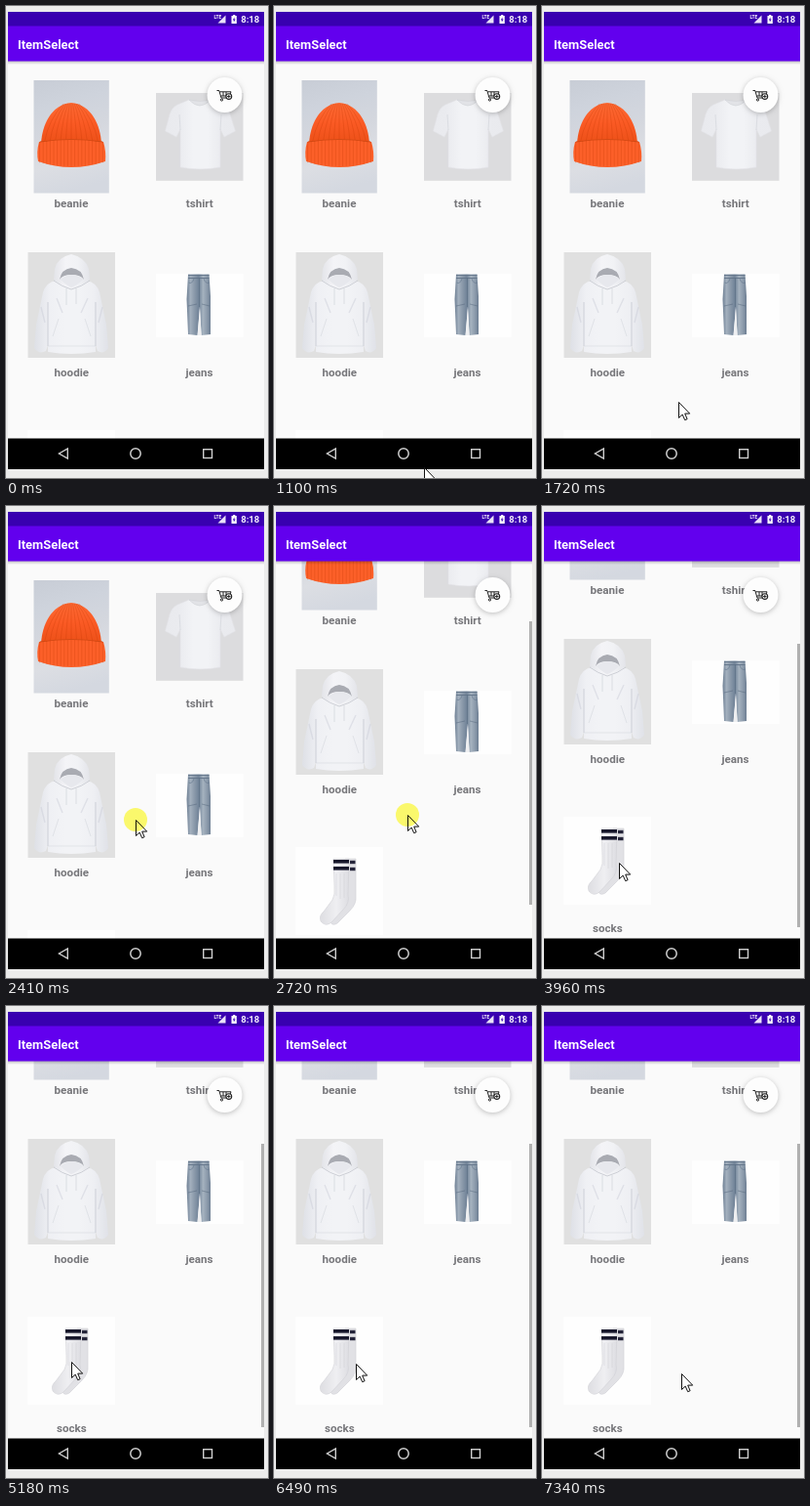
Recreate the animation shown at these times as an HTML page with a canvas. Size 269 by 483 pixels, loop 8000 ms.

```html
<!DOCTYPE html>
<html lang="en">
<head>
<meta charset="utf-8">
<title>ItemSelect</title>
<style>
html, body { margin: 0; width: 100%; height: 100%; overflow: hidden; background: #ececec; }
canvas { display: block; width: 269px; height: 483px; }
</style>
</head>
<body>
<canvas id="stage" width="269" height="483"></canvas>
<script>
const ctx = document.getElementById('stage').getContext('2d');
const LOOP = 8000, STEP = 78;

// Keyframes: [time, ...values]
const cursorKeys = [
  [1100, 154, 472], [1260, 150, 449], [1410, 144, 426], [1570, 139, 411], [1720, 140, 405],
  [2020, 140, 405], [2410, 133, 321], [2720, 137, 316], [3120, 137, 316], [3430, 120, 344],
  [3740, 91, 365], [4040, 67, 365], [4269, 67, 365], [4270, 67, 364], [4439, 67, 364],
  [4440, 67, 363], [4749, 67, 363], [4750, 67, 364], [6010, 67, 364], [6480, 84, 366],
  [6850, 107, 375], [7090, 141, 376], [7180, 141, 376], [7260, 142, 376], [7340, 143, 376]
];
const scrollKeys = [
  [2410, 0], [2490, 20], [2720, 85], [2870, 85], [2950, 96], [3030, 105], [3120, 112], [3180, 115], [3260, 116]
];
const presses = [[1890, 2950], [4440, 4590]];

function sample(keys, t) {
  if (t <= keys[0][0]) return keys[0].slice(1);
  for (let i = 1; i < keys.length; i++) {
    const a = keys[i - 1], b = keys[i];
    if (t >= b[0]) continue;
    const span = b[0] - a[0], n = Math.max(1, Math.round(span / STEP));
    const u = Math.floor((t - a[0]) / span * n + 1e-6) / n;
    return a.slice(1).map((v, k) => v + (b[k + 1] - v) * u);
  }
  return keys[keys.length - 1].slice(1);
}

function rect(x, y, w, h, color) {
  ctx.fillStyle = color;
  ctx.fillRect(x, y, w, h);
}

function shape(d, fill, stroke, width = 1) {
  const path = new Path2D(d);
  if (fill) { ctx.fillStyle = fill; ctx.fill(path); }
  if (stroke) { ctx.strokeStyle = stroke; ctx.lineWidth = width; ctx.stroke(path); }
}

function disc(x, y, r, fill, stroke, width = 1) {
  ctx.beginPath();
  ctx.arc(x, y, r, 0, Math.PI * 2);
  if (fill) { ctx.fillStyle = fill; ctx.fill(); }
  if (stroke) { ctx.strokeStyle = stroke; ctx.lineWidth = width; ctx.stroke(); }
}

function text(str, x, y, font, color, align = 'left') {
  ctx.font = font + ' Roboto, sans-serif';
  ctx.textAlign = align;
  ctx.fillStyle = color;
  ctx.fillText(str, x, y);
}

function gradient(x0, y0, x1, y1, ...colors) {
  const g = ctx.createLinearGradient(x0, y0, x1, y1);
  colors.forEach((c, i) => g.addColorStop(i / (colors.length - 1), c));
  return g;
}

function label(str, x, y) {
  text(str, x, y, 'bold 11.6px', '#76767a', 'center');
}

function beanie() {
  rect(28.5, 76, 77.3, 115.5, gradient(28, 76, 60, 191, '#c8cdd6', '#ced3dc', '#d4d7de', '#dcdee3', '#d4d8e0'));
  shape('M36 141C37 122 46 101 67 99C88 101 97 122 98 141Z', gradient(0, 99, 0, 141, '#fd6a34', '#fa5a24', '#ec5018'));
  for (let i = -5; i <= 5; i++) {
    shape(`M${67 + i * 1.6} 100Q${67 + i * 4.6} 116 ${67 + i * 5.5} 139`, null, 'rgba(195,55,5,.3)', 0.9);
  }
  shape('M34 139Q67 134 100 139Q103 149 102 159Q67 171 33 159Q31 149 34 139Z', '#fc6029');
  shape('M35 139Q67 134 99 139', null, '#d34a15', 1.2);
  for (let i = -9; i <= 9; i++) {
    const x = 67 + i * 3.6, sag = i * i * 0.045;
    shape(`M${x} ${137 + sag * 0.5}V${164 - sag}`, null, 'rgba(195,55,5,.3)', 0.9);
  }
}

function tshirt() {
  rect(154, 89, 89.5, 89.8, '#dcdcde');
  shape('M188 96L176 101Q170 104 168 111L163.5 128L175 134L179 126L179 165Q199 169 220 165L220 126L224 134L235.5 128L230 111Q228 104 222 101L210 96Q199 103 188 96Z',
    gradient(163, 0, 236, 0, '#e9eaee', '#eaebef', '#f2f3f6', '#f2f3f6', '#eaebef', '#e9eaee'), '#e2e3e8', 0.6);
  shape('M188 96Q199 108 210 96Q199 99 188 96Z', '#e2e3e7', '#d2d3d9', 0.6);
  shape('M179 127L178 111M220 127L221 111', null, '#d9dbe0', 0.9);
}

function hoodie() {
  rect(22.5, 252, 89.5, 108, '#e0e0e0');
  shape('M51 281Q41 283 38 293L31 326L29 350Q34 357 41 353L43 347L43 354Q67 358 92 354L92 347L94 353Q100 357 105 350L103 326L96 293Q93 283 83 281Z',
    gradient(30, 0, 105, 0, '#dfe1e7', '#eff0f4', '#f2f3f6', '#f2f3f6', '#eeeff3', '#e0e2e8'));
  shape('M67 254Q53 257 50 269L49 280Q57 286 67 289Q78 286 86 280L85 269Q81 257 67 254Z', gradient(49, 0, 86, 0, '#e3e4e9', '#f4f4f7', '#f1f2f5', '#e3e4e9'));
  shape('M55 280Q57 269 67 268Q78 269 80 280Q77 275 67 275Q58 275 55 280Z', '#a9abb2');
  shape('M56 280Q62 275 67 275Q74 275 79 280Q73 286 67 288Q62 286 56 280Z', '#e7e8ed');
  shape('M49 281Q57 287 67 290Q78 287 86 281', null, '#c9cbd2', 0.9);
  shape('M62 289V306M72 289V305', null, '#d2d4da', 0.7);
  shape('M54 320L48 338M81 320L87 338M43 348H92', null, '#d9dbe1', 0.7);
  shape('M43 303V348M92 303V348', null, '#cfd2d9', 1.1);
  shape('M36 308L40 324M99 308L95 324M52 299L58 314M84 299L77 314', null, 'rgba(200,203,212,.45)', 1.4);
}

function jeans() {
  rect(154, 274, 89.8, 65, '#fefefe');
  const denim = gradient(185, 0, 211, 0, '#66788d', '#a3b0be', '#8998a9', '#718398', '#a5b2bf', '#8a99aa', '#64768b');
  shape('M187 274.5H208.5L210 297V336L200.5 337L199 308L196.5 337L187 336L185.5 300Z', denim);
  shape('M187 275.5H208.5M187 278.5H208.5', null, '#62748a', 0.9);
  shape('M198.5 278V308', null, '#5f7187', 0.8);
  shape('M187.5 283Q191 285 193 279M203 279Q205 285 209 283', null, '#697b91', 0.7);
  shape('M187 307L196 305M201 305L209 307', null, 'rgba(84,102,124,.5)', 1);
  shape('M199 309L196.7 337H200.7Z', '#eeeff1');
}

function socks() {
  rect(22, 434, 90, 90, '#fefefe');
  shape('M73 446H84V484Q85 492 78 499L65 512Q60 515 58 511L72 490Z', '#e1e1e5', '#d0d0d5', 0.6);
  shape('M61 446H77L76 483Q78 491 71 498L59 511Q53 516 48 510Q46 504 51 500L60 488Q63 483 62 474Z', gradient(50, 0, 78, 0, '#e0e0e4', '#efeff2', '#dcdce1'), '#d0d0d5', 0.6);
  for (const y of [447, 454]) {
    rect(61, y, 16, 3.6, '#17172b');
    rect(78, y + 0.8, 5.5, 3.4, '#25253a');
  }
  shape('M64 461V484M68 461V487M72 461V486', null, 'rgba(190,190,198,.4)', 0.8);
}

function items(scroll) {
  ctx.save();
  ctx.beginPath();
  ctx.rect(2, 56, 263, 387);
  ctx.clip();
  ctx.translate(0, -scroll);
  beanie();
  tshirt();
  hoodie();
  jeans();
  socks();
  label('beanie', 67, 206);
  label('tshirt', 198.7, 206);
  label('hoodie', 67.3, 379);
  label('jeans', 198.5, 379);
  label('socks', 67.3, 552);
  ctx.restore();
}

function cartButton() {
  ctx.save();
  ctx.shadowColor = 'rgba(0,0,0,.24)';
  ctx.shadowBlur = 5;
  ctx.shadowOffsetY = 1.2;
  disc(224.5, 91, 18, '#fdfdfd');
  ctx.restore();
  shape('M216.5 86.5H218.8L221 94H228M219.5 87.8H231L229.5 92H220.8M223 88V92M226 88V92', null, '#222', 1);
  disc(221.5, 96, 1.1, null, '#222');
  disc(228.8, 92.6, 2.9, '#fff', '#222', 1.1);
  shape('M227 92.6H230.6M228.8 90.8V94.4', null, '#222', 1);
}

function bars() {
  rect(2, 56, 263, 4, gradient(0, 56, 0, 60, 'rgba(0,0,0,.24)', 'rgba(0,0,0,0)'));
  rect(2, 20, 263, 36.5, '#6200ee');
  rect(2, 6, 263, 14.5, '#3900b0');
  text('ItemSelect', 12, 43.7, 'bold 12.9px', '#fff');

  text('LTE', 213.5, 13, 'bold 4.8px', '#fff');
  shape('M225.5 9.5V17.5H217.5Z', '#e9e2f8');
  shape('M232 10H233.2V9H235.3V10H236.8V18H231.5V10Z', '#fff');
  shape('M234.6 11.2L232.8 14.4H234L233.7 16.8L235.6 13.4H234.4Z', '#3900b0');
  text('8:18', 241.2, 17, 'bold 9.5px', '#f4f0fc');

  rect(2, 442.5, 263, 31.5, '#000');
  shape('M63.3 453V463L54.5 458Z', null, '#cfcfcf', 1.4);
  disc(133, 458, 5.2, null, '#cfcfcf', 1.5);
  ctx.strokeStyle = '#cfcfcf';
  ctx.lineWidth = 1.4;
  ctx.strokeRect(202.7, 453.7, 8.8, 8.8);
}

// The press highlight tints everything beneath it, pointer included
function pointer(x, y, pressed) {
  ctx.save();
  ctx.translate(x + 0.5, y + 0.5);
  shape('M0 0V16L3.7 12.6L6.2 18.2L8.6 17.2L6.2 11.6H11.2Z', '#fff', '#111', 1);
  ctx.globalCompositeOperation = 'multiply';
  if (pressed) disc(-0.5, -0.5, 12, '#fffd6e');
  ctx.restore();
}

function draw(t) {
  const scroll = Math.round(sample(scrollKeys, t)[0]);
  rect(0, 0, 269, 483, '#ececec');
  rect(2, 56, 263, 387, '#fafafa');
  items(scroll);
  if (scroll > 0) rect(262, Math.round(56 + scroll * 0.735), 3, 290, '#b0b0b0');
  cartButton();
  bars();
  if (t >= cursorKeys[0][0]) {
    const [x, y] = sample(cursorKeys, t).map(Math.round);
    pointer(x, y, presses.some(([from, to]) => t >= from && t < to));
  }
}

const start = performance.now();
function tick() {
  draw((performance.now() - start) % LOOP);
  requestAnimationFrame(tick);
}
tick();
</script>
</body>
</html>
```
